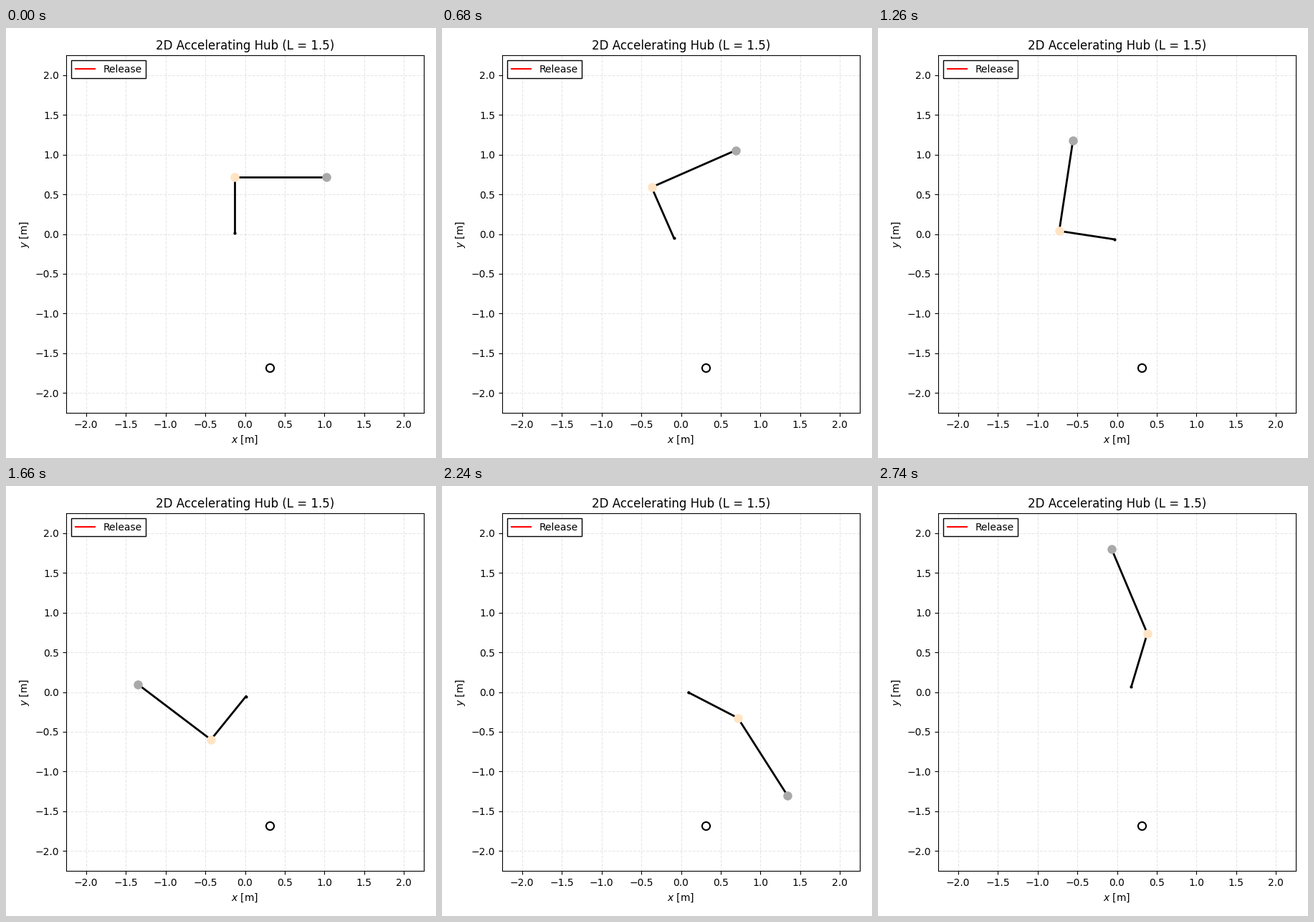
Recreate the animation shown at these times as a matplotlib script. Size 600 px wide and 600 px high, loop 2.76 s.

```python
import numpy as np
import matplotlib.pyplot as plt
from matplotlib.animation import FuncAnimation

FRAMES, INTERVAL = 138, 20
ARM, CLUB = 0.7, 1.155          # link lengths [m]
RELEASE = 77                    # step at which the wrist lets go
ACCEL = 0.041                   # arm acceleration while locked [deg / step^2]

# (step, angle, rate) after release, in degrees
ARM_KEYS = np.array([
    (77, 211.54, 3.157), (83, 231.05, 3.36), (100, 290.1, 3.5),
    (124, 377.65, 3.9), (137, 433.3, 4.6)])
WRIST_KEYS = np.array([
    (77, -90, 0), (83, -88.2, 0.65), (100, -64, 2.35),
    (124, 8.9, 3.2), (137, 39.6, 1.45)])


def hermite(keys, t):
    """Cubic Hermite interpolation through (time, value, rate) rows."""
    k = np.clip(np.searchsorted(keys[:, 0], t, side="right") - 1, 0, len(keys) - 2)
    (t0, p0, v0), (t1, p1, v1) = keys[k], keys[k + 1]
    h = t1 - t0
    s = (t - t0) / h
    return ((1 + 2 * s) * (1 - s) ** 2 * p0 + s * s * (3 - 2 * s) * p1
            + h * s * (1 - s) * ((1 - s) * v0 - s * v1))


def hub(t):
    """Hub position under constant acceleration."""
    return np.array([-0.128 + 8.14e-4 * t + 1.046e-5 * t * t,
                     0.013 - 2.669e-3 * t + 2.236e-5 * t * t])


def angles(t):
    if t < RELEASE:
        arm, wrist = 90 + ACCEL * t * t / 2, -90
    else:
        arm, wrist = hermite(ARM_KEYS, t), hermite(WRIST_KEYS, t)
    return np.radians(arm), np.radians(arm + wrist)


def polar(r, a):
    return r * np.array([np.cos(a), np.sin(a)])


fig = plt.figure(figsize=(6, 6), dpi=100)
ax = fig.add_axes([84 / 600, 63 / 600, 499 / 600, 499 / 600])
ax.set(xlim=(-2.25, 2.25), ylim=(-2.25, 2.25), xlabel="$x$ [m]", ylabel="$y$ [m]",
       title="2D Accelerating Hub (L = 1.5)")
ticks = np.arange(-2, 2.1, 0.5)
ax.set_xticks(ticks)
ax.set_yticks(ticks)
ax.set_axisbelow(True)
ax.grid(ls="--", alpha=0.3)

ax.plot([], [], color="red", label="Release")
ax.plot(0.311, -1.682, "o", ms=8, mfc="none", mec="black", mew=1.5)
links, = ax.plot([], [], color="black", lw=2, zorder=3)
pivot, = ax.plot([], [], "o", color="black", ms=2, zorder=4)
wrist_dot, = ax.plot([], [], "o", color="bisque", ms=8, zorder=5)
head_dot, = ax.plot([], [], "o", color="darkgray", ms=8, zorder=5)
ax.legend(loc="upper left", fancybox=False, edgecolor="black", framealpha=1)


def update(t):
    arm, club = angles(t)
    base = hub(t)
    wrist = base + polar(ARM, arm)
    head = wrist + polar(CLUB, club)
    links.set_data(*np.array([base, wrist, head]).T)
    for dot, p in ((pivot, base), (wrist_dot, wrist), (head_dot, head)):
        dot.set_data([p[0]], [p[1]])
    return links, pivot, wrist_dot, head_dot


anim = FuncAnimation(fig, update, frames=FRAMES, interval=INTERVAL,
                     repeat=True, repeat_delay=0)
plt.show()
```
